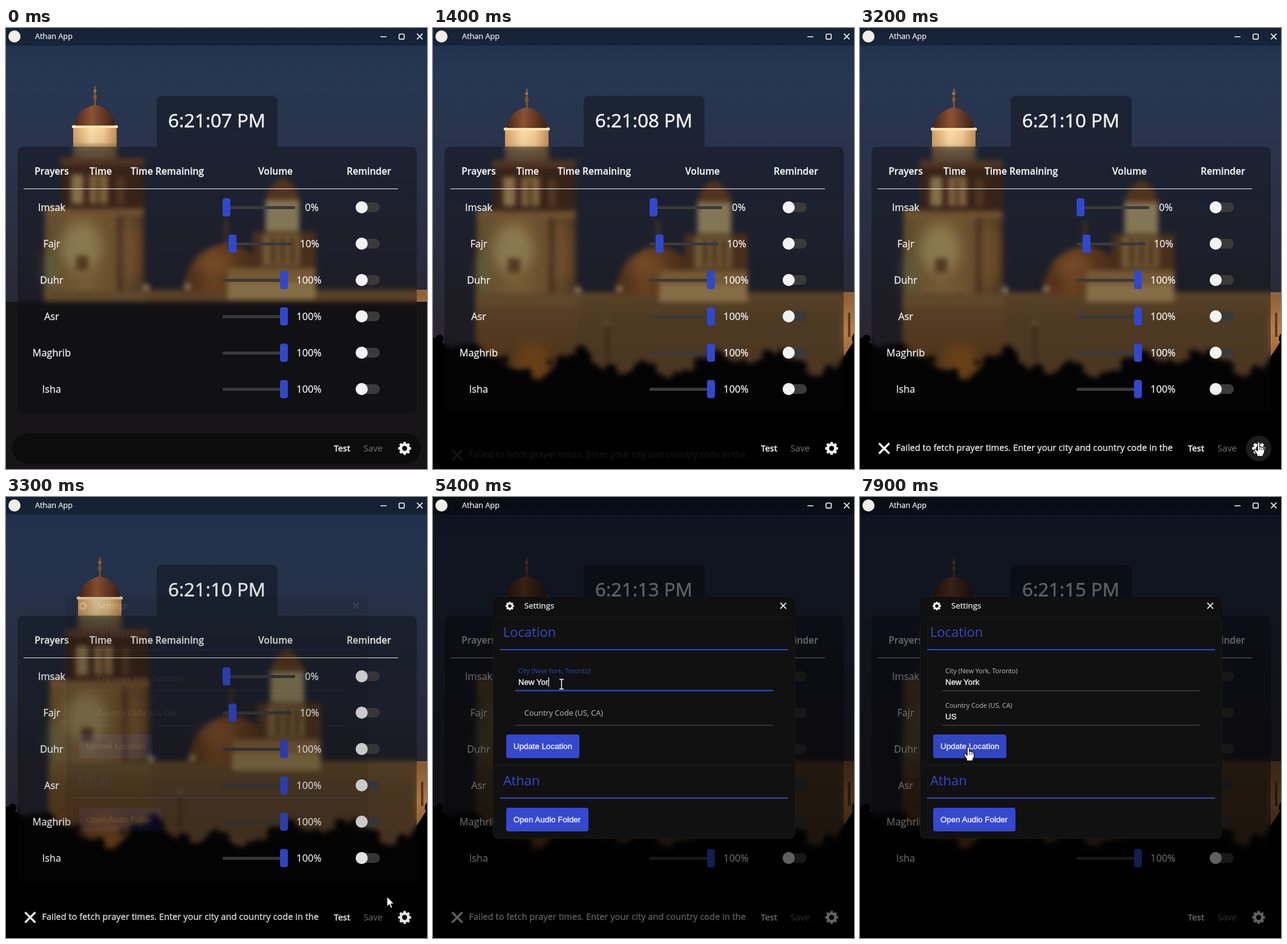
Write an HTML page that moves like this. It is 696x728 px and loops after 8000 ms.

```html
<!DOCTYPE html>
<html lang="en">
<head>
<meta charset="utf-8">
<title>Athan App</title>
<style>
html, body { margin: 0; width: 100%; height: 100%; overflow: hidden; background: #000; }
svg { display: block; width: 696px; height: 728px; }
text { font-family: "Open Sans", "Noto Sans", sans-serif; font-weight: 500; fill: #f0f0f0; white-space: pre; }
.head { font-size: 15.6px; font-weight: 600; text-anchor: middle; stroke: #f0f0f0; stroke-width: .3px; }
.cell { font-size: 16.3px; text-anchor: middle; stroke: #f0f0f0; stroke-width: .3px; }
.bar { font-size: 14.65px; stroke: #f0f0f0; stroke-width: .3px; }
.clock { font-size: 31.2px; text-anchor: middle; stroke: #f0f0f0; stroke-width: .6px; }
.small { stroke: #f0f0f0; stroke-width: .25px; }
.label { font-size: 12.63px; font-weight: 400; }
.title { font-size: 21.9px; font-weight: 400; fill: #3448cc; }
.ui { font: 13.333px "Liberation Sans", Arial, sans-serif; stroke: #f0f0f0; stroke-width: .4px; }
.line { stroke: #f4f4f4; fill: none; }
</style>
</head>
<body>
<svg id="stage" viewBox="0 0 696 728"></svg>
<script>
const LOOP = 8000;
const stage = document.getElementById('stage');

const rect = (x, y, w, h, fill, r = 0, more = '') =>
  `<rect x="${x}" y="${y}" width="${w}" height="${h}" rx="${r}" fill="${fill}" ${more}/>`;
const text = (x, y, cls, s, more = '') => `<text x="${x}" y="${y}" class="${cls}" ${more}>${s}</text>`;
const path = (d, fill, more = '') => `<path d="${d}" fill="${fill}" ${more}/>`;
const cross = (x, y, r, w) =>
  `<path class="line" stroke-width="${w}" d="M${x - r} ${y - r}l${2 * r} ${2 * r}m0 ${-2 * r}l${-2 * r} ${2 * r}"/>`;

function gear(x, y, r, id = '') {
  let teeth = '';
  for (let i = 0; i < 8; i++)
    teeth += `<path class="line" stroke-width="${r * .4}" stroke-linejoin="round" d="M0 ${-r * .7}V${-r}" transform="rotate(${i * 45})"/>`;
  return `<g transform="translate(${x} ${y})"><g ${id && `id="${id}"`}>${teeth}
    <circle class="line" r="${r * .6}" stroke-width="${r * .42}"/></g></g>`;
}

function trees() {
  const tops = [503, 522, 520, 540, 558, 576, 542, 528, 556, 564, 545, 570, 564, 535, 541, 546, 530, 540, 570, 556, 502];
  let seed = 7, out = '', d = 'M-40 760V508';
  const rnd = () => (seed = seed * 16807 % 2147483647) / 2147483647;
  tops.forEach((y, i) => {
    const x = i * 35;
    d += `L${x} ${y + 8}`;
    for (let k = 0; k < 5; k++)
      out += `<circle cx="${(x + rnd() * 34 - 17).toFixed(1)}" cy="${(y + 6 + rnd() * 16).toFixed(1)}" r="${(4 + rnd() * 7).toFixed(1)}"/>`;
  });
  return path(d + 'L760 508V760Z', '#000') + out + rect(-40, 592, 780, 180, '#000');
}

const glow = (x, y, rx, ry, color, opacity) =>
  `<ellipse cx="${x}" cy="${y}" rx="${rx}" ry="${ry}" fill="${color}" opacity="${opacity}" filter="url(#soft)"/>`;

const scene = `
  ${rect(-40, -40, 780, 810, 'url(#sky)')}
  ${rect(228, 436, 520, 170, 'url(#wall)')}
  ${path('M300 440C302 395 335 363 372 360C412 363 440 395 444 440Z', 'url(#dome)')}
  ${glow(352, 392, 30, 16, '#c98044', .6)}
  ${rect(370, 318, 4, 45, '#8b5630')}
  ${rect(416, 340, 104, 94, '#6f4826')}
  ${rect(432, 344, 62, 52, '#b48c50')}
  ${[446, 462, 478].map(x => rect(x, 350, 7, 42, '#6d4a25')).join('')}
  ${rect(437, 286, 56, 54, '#cfbb82')}
  ${path('M438 288C440 264 455 258 465 250C475 258 490 264 492 288Z', '#80502a')}
  ${rect(374, 400, 146, 26, '#b98a4e')}
  ${rect(374, 424, 146, 28, '#d3ae6a')}
  ${rect(72, 302, 164, 160, 'url(#stone)')}
  ${glow(132, 366, 34, 40, '#e8d189', .75)}
  ${glow(82, 405, 12, 36, '#93a56c', .55)}
  ${rect(192, 312, 9, 130, '#6c4826')}
  ${glow(215, 372, 12, 52, '#c58b4a', .7)}
  ${rect(124, 380, 20, 24, '#80572f')}
  ${rect(70, 456, 168, 170, 'url(#base)')}
  ${rect(70, 438, 168, 22, '#94703f')}
  ${glow(165, 548, 28, 30, '#c1701f', .6)}
  ${rect(74, 300, 162, 14, '#b08048')}
  ${path('M100 302V236L112 220H224L236 236V302Z', '#55331f')}
  ${rect(116, 246, 20, 48, '#d8b070')}${rect(146, 246, 30, 48, '#d0a262')}${rect(156, 250, 9, 44, '#8f6536')}
  ${rect(190, 250, 14, 44, '#7d5430')}
  ${rect(98, 218, 138, 13, '#7c5030')}
  ${rect(119, 164, 72, 56, 'url(#drum)')}
  ${rect(119, 164, 72, 56, 'url(#dusk)')}
  ${rect(117, 165, 76, 4, '#ffe3b0')}
  ${path('M122 165C122 147 136 135 155 131C174 135 188 147 188 165Z', 'url(#cap)')}
  ${rect(154, 100, 2.4, 33, '#8a5834')}
  <ellipse cx="155" cy="118" rx="3" ry="5" fill="#85542c"/><circle cx="155" cy="108" r="2.6" fill="#a87242"/>
  ${rect(676, 440, 60, 150, 'url(#side)')}
  ${rect(686, 470, 4, 40, '#5d3b22')}
  <g fill="#f1dba8"><circle cx="240" cy="432" r="5"/><circle cx="308" cy="431" r="5"/><circle cx="288" cy="488" r="4" opacity=".6"/></g>
  ${rect(287, 488, 3, 60, '#3a2714')}
  ${trees()}
  ${rect(-40, 456, 790, 320, '#171517', 0, 'id="cover"')}`;

function row(name, i) {
  const y = 296 + i * 60;
  const [end, thumb, pct, px] = [[478, 358, '0%', 505.5], [472, 368, '10%', 502]][i] || [466, 453, '100%', 501];
  return text(75.5, y + 6, 'cell', name) +
    rect(358, y - 2, end - 358, 5, '#3a3a3a', 2) + rect(thumb, y - 15, 13, 30, '#3148cc', 4) +
    text(px, y + 6, 'cell', pct) +
    rect(579, y - 8, 39, 16, '#3a3a3a', 8) + `<circle cx="588" cy="${y}" r="10" fill="#f2f2f2"/>`;
}

const field = (id, label, y) => `
  ${rect(136, y + 1, 426, 1.6, '#3d3d3d', .8)}
  <rect id="${id}Line" x="136" y="${y + .6}" width="0" height="2" rx="1" fill="#3448d0"/>
  <text id="${id}Label" class="label">${label}</text>
  ${text(141, y - 8, 'ui', '', `id="${id}Text"`)}
  ${rect(141, y - 20, 1.2, 15, '#fff', 0, `id="${id}Caret"`)}`;

const stop = ([o, c, a = 1]) => `<stop offset="${o}" stop-color="${c}" stop-opacity="${a}"/>`;
const fade = (id, stops, dir = 'x2="0" y2="1"') =>
  `<linearGradient id="${id}" ${dir}>${stops.map(stop).join('')}</linearGradient>`;

stage.innerHTML = `
<defs>
  ${fade('sky', [[0, '#1c2d49'], [.14, '#263753'], [.28, '#29344c'], [.45, '#2a2f42'], [.65, '#2a2733']])}
  ${fade('wall', [[0, '#8f683a'], [.25, '#7a5a34'], [1, '#74502c']])}
  ${fade('base', [[0, '#8a6538'], [.5, '#7a5024'], [1, '#94581c']])}
  ${fade('side', [[0, '#8f6038'], [.4, '#b87e49'], [1, '#7a4a22']])}
  ${fade('drum', [[0, '#d79f62'], [.4, '#ffe2ae'], [.7, '#f7cf95'], [1, '#c58f58']], '')}
  ${fade('dusk', [[0, '#80603c', 0], [.5, '#80603c', .15], [.65, '#7d6646', .7], [1, '#6d573c', .8]])}
  ${fade('dome', [[0, '#70421f'], [.35, '#a5652d'], [1, '#5f361c']], '')}
  ${fade('cap', [[0, '#4c281a'], [.42, '#8d5233'], [1, '#3c2119']], '')}
  ${fade('stone', [[0, '#94733f'], [.4, '#bb9150'], [.75, '#a37640'], [1, '#74502c']], '')}
  <filter id="soft" x="-1" y="-1" width="3" height="3"><feGaussianBlur stdDeviation="9"/></filter>
  <filter id="blur" filterUnits="userSpaceOnUse" x="-40" y="-40" width="780" height="810" color-interpolation-filters="sRGB"><feGaussianBlur stdDeviation="4.2"/></filter>
  <clipPath id="panel"><path d="M249 196V122q0-10 10-10H439q10 0 10 10V196H669q10 0 10 10V626q0 10-10 10H29q-10 0-10-10V206q0-10 10-10Z"/></clipPath>
</defs>
<g id="scene">${scene}</g>
<g clip-path="url(#panel)"><use href="#scene" filter="url(#blur)"/>${rect(0, 0, 696, 728, '#0a0a0c', 0, 'opacity=".39"')}</g>
${rect(10, 669, 676, 50, '#000', 25, 'opacity=".45"')}
${rect(0, 0, 696, 29, '#060d18', 0, 'opacity=".4"')}
${text(348.5, 164, 'clock', '', 'id="clock"')}
${[['Prayers', 75.5], ['Time', 156.5], ['Time Remaining', 266.5], ['Volume', 445.5], ['Reminder', 600]].map(([s, x]) => text(x, 242, 'head', s)).join('')}
${rect(29, 265, 619, 1, '#f0f0f0')}
${['Imsak', 'Fajr', 'Duhr', 'Asr', 'Maghrib', 'Isha'].map(row).join('')}
<g id="fetch">${gear(40, 694, 7, 'spin')}${text(59.5, 698, 'bar', 'Fetching Prayer times...')}</g>
<g id="fail">${cross(40, 694, 8.5, 3.2)}${text(59.5, 698, 'bar', 'Failed to fetch prayer times. Enter your city and country code in the')}</g>
${text(542, 699, 'small', 'Test', 'font-size="14" style="font-weight:600"')}
${text(591, 699, '', 'Save', 'font-size="14.6" style="fill:#777"')}
<circle id="halo" cx="659" cy="694" r="21" fill="#1d1d1d"/>
${gear(659, 694, 10.6)}
${rect(0, 0, 696, 728, '#000', 0, 'id="shade"')}
<circle cx="14" cy="14" r="10" fill="#f1eee6"/>
${text(48, 18, 'small', 'Athan App', 'font-size="12.7"')}
<path class="line" stroke-width="1.5" d="M619 14.5h10"/>
<rect class="line" stroke-width="1.6" x="649.8" y="10" width="8.6" height="8.4" rx="2"/>
${cross(684, 14, 4.6, 1.6)}
<g id="dialog">
  ${rect(99, 165, 500, 399, '#101010', 10)}
  ${rect(99.5, 197.5, 499, 244.5, '#111', 8, 'stroke="#191919"')}
  ${rect(99.5, 442.5, 499, 121, '#111', 8, 'stroke="#191919"')}
  ${gear(127, 180, 7)}
  ${text(151, 184, 'small', 'Settings', 'font-size="13.3"')}
  ${cross(579, 179.5, 4.8, 1.7)}
  ${text(116, 231, 'title', 'Location')}${rect(111, 251, 476, 2, '#3346c6')}
  ${field('city', 'City (New York, Toronto)', 318)}
  ${field('code', 'Country Code (US, CA)', 375)}
  ${rect(121, 392, 121, 39, '#3448d0', 4, 'id="update"')}${text(133, 416, 'ui', 'Update Location')}
  ${text(116, 476, 'title', 'Athan')}${rect(111, 496, 476, 2, '#3346c6')}
  ${rect(121, 513, 136, 39, '#3448d0', 4)}${text(133, 537, 'ui', 'Open Audio Folder')}
</g>
<g id="pointer" stroke="#000" stroke-linejoin="round">
  ${path('M0 0V16.5L3.9 13L6.4 19L9 17.9L6.5 12.1H11.6Z', '#fff', 'id="arrow"')}
  <g id="hand">${path('M-1.8 1.2Q0 -1.4 1.8 1.2V8Q3.5 6.4 5 8.4Q6.8 7.2 7.8 9.2Q10 8.6 9.8 11.2V15Q9.6 18 7.6 20V23H-2.6V20.5L-7 13.6Q-7.4 10.6 -4.6 11.4L-1.8 14Z', '#fff', 'stroke-width="1.1"')}
    <path d="M1.8 9v4M5 9.5v3.5M7.8 10v3" fill="none" stroke-width=".9"/></g>
  <path id="beam" d="M-3.5 -8H-1L0 -7L1 -8H3.5M0 -7V7M-3.5 8H-1L0 7L1 8H3.5" fill="none" stroke="#fff" stroke-width="1.4"/>
</g>`;

const el = {};
stage.querySelectorAll('[id]').forEach(n => el[n.id] = n);
const set = (id, attrs) => { for (const k in attrs) el[id].setAttribute(k, attrs[k]); };
const show = (id, on) => { el[id].style.display = on ? '' : 'none'; };
const lerp = (a, b, u) => a + (b - a) * u;
const ease = (t, from, dur) => {
  const u = Math.min(1, Math.max(0, (t - from) / dur));
  return u * u * (3 - 2 * u);
};

// time, x, y
const route = [
  [1700, 84, 740], [2000, 78, 672], [2150, 110, 690], [2600, 565, 690], [2900, 659, 684], [3260, 659, 684],
  [3520, 222, 318], [3640, 212.5, 309], [6850, 212.5, 309], [7500, 179, 412.5], [LOOP, 179, 412.5]
];
const fields = {
  city: { y: 304, value: 'New York', keys: [4400, 4600, 4600, 4700, 5000, 5200, 5300, 5500], focus: 3720, blur: 5600 },
  code: { y: 361, value: 'US', keys: [6300, 6400], focus: 5600, blur: 7650 }
};

function drawField(id, f, t) {
  const float = ease(t, f.focus, 200);
  const active = float * (1 - ease(t, f.blur, 150));
  const typed = f.keys.filter(k => k <= t);
  const color = [[190, 52], [190, 68], [190, 196]].map(([a, b]) => Math.round(lerp(a, b, active)));
  set(id + 'Label', { transform: `translate(${151 - 10 * float} ${f.y - 13 * float}) scale(${1 - .146 * float})` });
  el[id + 'Label'].style.fill = `rgb(${color})`;
  set(id + 'Line', { width: 426 * float, opacity: t < f.blur ? 1 : active });
  el[id + 'Text'].textContent = f.value.slice(0, typed.length);
  const since = t - (typed.length ? typed[typed.length - 1] : f.focus);
  set(id + 'Caret', { x: 141 + (typed.length ? el[id + 'Text'].getComputedTextLength() : 0) });
  show(id + 'Caret', t >= f.focus && t < f.blur && since % 1000 < 500);
}

function drawPointer(t) {
  const i = route.findIndex(p => p[0] > t);
  show('pointer', i > 0);
  ['arrow', 'hand', 'beam', 'halo'].forEach(id => show(id, false));
  if (i < 1) return;
  const [a, b] = [route[i - 1], route[i]];
  const u = ease(t, a[0], b[0] - a[0]);
  const x = lerp(a[1], b[1], u), y = lerp(a[2], b[2], u);
  const inside = (l, r, top, bottom) => x > l && x < r && y > top && y < bottom;
  const open = t > 3280;
  const onGear = !open && Math.hypot(x - 659, y - 694) < 21;
  const onTest = !open && inside(530, 584, 676, 712);
  const onUpdate = open && inside(121, 242, 392, 431);
  const onField = open && (inside(136, 562, 270, 320) || inside(136, 562, 326, 377));
  show(onGear || onTest || onUpdate ? 'hand' : onField ? 'beam' : 'arrow', true);
  show('halo', onGear);
  if (onUpdate) set('update', { fill: '#3146c2' });
  set('pointer', { transform: `translate(${x} ${y})` });
}

function draw(t) {
  const early = t < 100;
  set('scene', { transform: early ? 'translate(-8 -4)' : '' });
  show('cover', early);

  const sec = t < 640 ? 7 : Math.min(15, 8 + Math.floor((t - 640) / 910));
  el.clock.textContent = `6:21:${String(sec).padStart(2, '0')} PM`;

  const fetchIn = ease(t, 450, 200), failIn = ease(t, 1370, 180);
  set('fetch', { opacity: t < 1370 ? fetchIn : 0, transform: `translate(0 ${20 * (1 - fetchIn)})` });
  set('spin', { transform: `rotate(${(Math.min(t, 1200) - 700) * .18})` });
  set('fail', { opacity: failIn * (1 - ease(t, 7650, 220)), transform: `translate(0 ${12 * (1 - failIn)})` });

  const open = ease(t, 3260, 200);
  set('shade', { opacity: .6 * open });
  set('dialog', { opacity: open });
  show('dialog', open > 0);
  set('update', { fill: '#3448d0' });
  for (const id in fields) drawField(id, fields[id], t);
  drawPointer(t);
}

const start = performance.now();
function tick() {
  draw((performance.now() - start) % LOOP);
  requestAnimationFrame(tick);
}
tick();
</script>
</body>
</html>
```
